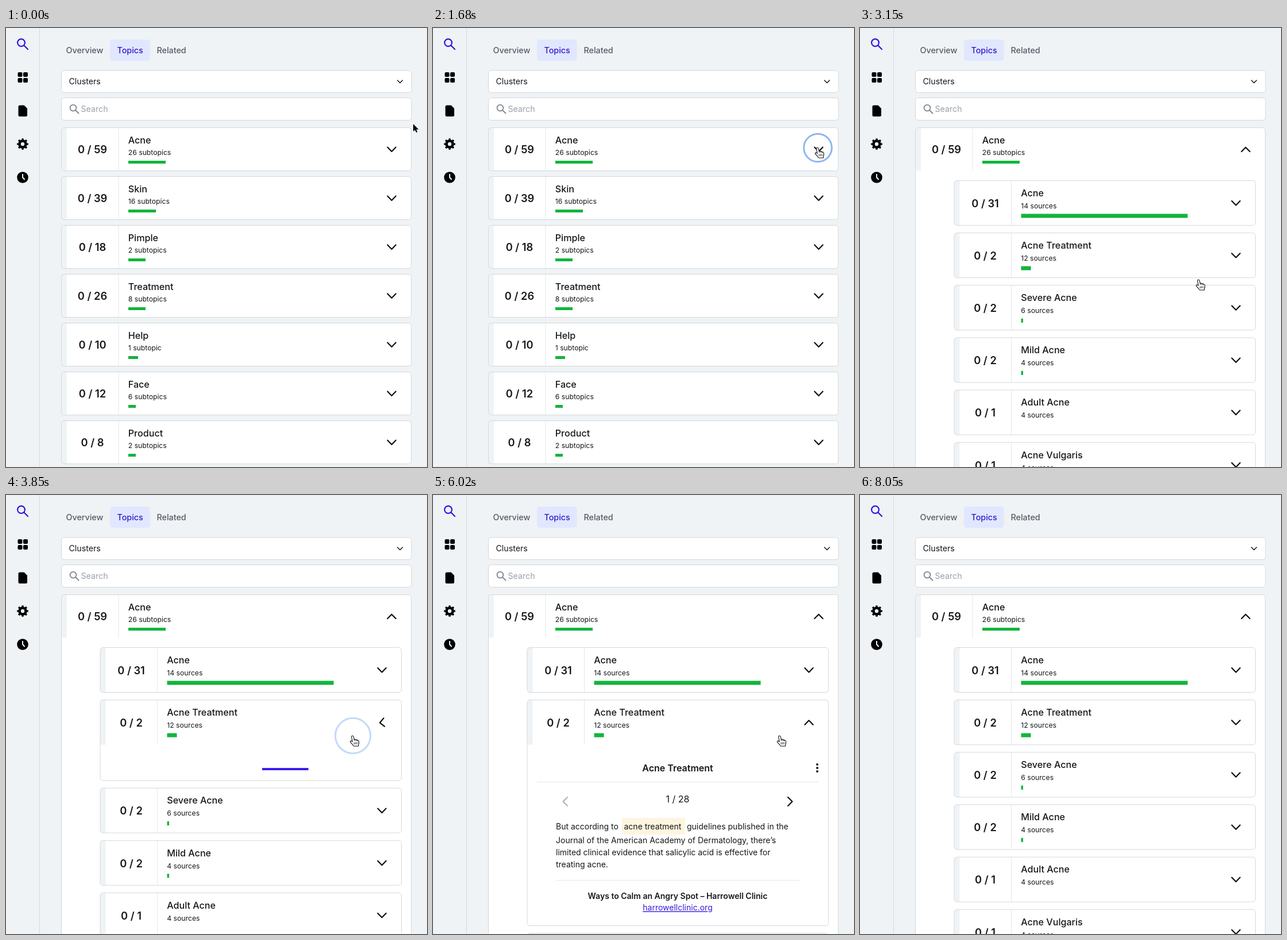
Recreate the animation shown at these times as an HTML page. Size 733 by 764 pixels, loop 8120 ms.

```html
<!DOCTYPE html>
<html lang="en">
<head>
<meta charset="utf-8">
<title>Topic clusters</title>
<style>
  html, body { margin: 0; width: 100%; height: 100%; overflow: hidden; background: #eff3f5; }
  svg { display: block; width: 733px; height: 764px; font-family: Inter, sans-serif; font-size: 14px; fill: #15171a; }
  .mid { text-anchor: middle; }
  .tab { font-size: 14.3px; font-weight: 500; fill: #565b67; }
  .title { font-size: 16.1px; font-weight: 500; }
  .note { font-size: 12.2px; }
  .count { font-size: 18.3px; font-weight: 600; }
  .box { fill: #fff; stroke: #d3d8dc; }
  .rule { fill: none; stroke: #e3e7ea; }
  .line { fill: none; stroke: #111; stroke-width: 2.2; stroke-linecap: round; stroke-linejoin: round; }
  .bar { fill: #12b53c; }
</style>
</head>
<body>
<svg viewBox="0 0 733 764">
  <path d="M58.5 0V764" stroke="#d5dade"/>
  <g fill="none" stroke="#2d12e0" stroke-width="2.2" stroke-linecap="round">
    <circle cx="26.5" cy="25.5" r="6.4"/><path d="M31.3 30.3L38 37"/>
  </g>
  <g fill="#000">
    <rect x="20.5" y="77" width="8" height="8" rx="2"/><rect x="30" y="77" width="8" height="8" rx="2"/>
    <rect x="20.5" y="87" width="8" height="8" rx="2"/><rect x="30" y="87" width="8" height="8" rx="2"/>
    <path d="M24 134.5H31.5L37 140V151.5Q37 154 34.5 154H24Q21.5 154 21.5 151.5V137Q21.5 134.5 24 134.5Z"/>
    <circle cx="29" cy="260" r="9.8"/>
  </g>
  <g fill="none" stroke="#000">
    <circle cx="29" cy="202" r="5.5" stroke-width="4.6"/>
    <circle cx="29" cy="202" r="8.4" stroke-width="2.8" pathLength="16" stroke-dasharray="1" stroke-dashoffset=".5"/>
    <path d="M29 254V260L32.6 264" stroke="#eff3f5" stroke-width="2"/>
  </g>

  <rect x="181" y="20" width="69.5" height="37" rx="5" fill="#e0e7ff"/>
  <text class="tab" x="104.5" y="43.6">Overview</text>
  <text class="tab" x="193.5" y="43.6" style="fill:#3419c9">Topics</text>
  <text class="tab" x="262.5" y="43.6">Related</text>

  <rect class="box" x="96.5" y="74" width="609.5" height="38.5" rx="5"/>
  <text x="109.5" y="98.3" font-size="14.2">Clusters</text>
  <path class="line" d="M681.5 91L686 95.5L690.5 91" style="stroke-width:1.4"/>
  <rect class="box" x="96.5" y="121.5" width="609.5" height="39" rx="5"/>
  <g fill="none" stroke="#7f858e" stroke-width="1.8" stroke-linecap="round">
    <circle cx="117" cy="139" r="5.4"/><path d="M121 143L126.5 148.5"/>
  </g>
  <text x="130.5" y="146" font-size="14.2" fill="#9aa0a9">Search</text>

  <g id="scene"></g>
</svg>
<script>
const LOOP = 8120, STEP = 70;
const OPEN_TOPIC = 1750, OPEN_SUB = 3780, LOADED = 5250, CLOSE_SUB = 6510;
const CLICKS = [[1550, 670, 208.5], [3590, 604, 419], [6350, 604, 419]];

const topics = [
  ['Acne', 59, '26 subtopics', 65], ['Skin', 39, '16 subtopics', 48], ['Pimple', 18, '2 subtopics', 30],
  ['Treatment', 26, '8 subtopics', 30], ['Help', 10, '1 subtopic', 17], ['Face', 12, '6 subtopics', 13],
  ['Product', 8, '2 subtopics', 13]];
const subtopics = [
  ['Acne', 31, '14 sources', 290], ['Acne Treatment', 2, '12 sources', 17], ['Severe Acne', 2, '6 sources', 3.5],
  ['Mild Acne', 2, '4 sources', 3.5], ['Adult Acne', 1, '4 sources', 0], ['Acne Vulgaris', 1, '4 sources', 0]];
// time, x, y of the pointer's hot spot
const pointerKeys = [
  [0, 709, 167], [350, 711, 168], [770, 711, 168], [1420, 670, 208], [1960, 670, 208], [2770, 590, 438],
  [3150, 590, 438], [3450, 604, 419], [7390, 604, 419], [7780, 540, 168], [8050, 415, -20]];

const clamp = v => Math.max(0, Math.min(1, v));
const text = (x, y, str, cls = '', extra = '') => `<text x="${x}" y="${y}" class="${cls}" ${extra}>${str}</text>`;
const rect = (x, y, w, h, attrs) => `<rect x="${x}" y="${y}" width="${w}" height="${h}" ${attrs}/>`;
const path = (d, attrs) => `<path d="${d}" ${attrs}/>`;

function card([name, total, note, bar], { x, y, w, head, height = head, turn = 0, sub = 0 }) {
  const cx = w - 34, cy = head / 2 + .3;
  return `<g transform="translate(${x} ${y})">` +
    rect(0, 0, w, height, 'rx="5" fill="#fff"') +
    path(`M9.5 0H5Q0 0 0 5V${head - 5}Q0 ${head} 5 ${head}H9.5Z`, 'fill="#eff3f5"') +
    path(`M99.5 0V${head}`, 'class="rule"') +
    rect(0, 0, w, height, 'rx="5" class="box" style="fill:none"') +
    text(54, 44.5 + sub * 1.8, '0 / ' + total, 'count mid') +
    text(116.3, 27.4, name, 'title') +
    text(116.3, 47.8 + sub * .6, note, 'note') +
    rect(116.5, 57.5 + sub * .4, bar, 5 + sub * 2, 'class="bar"') +
    path(`M${cx - 7.2} ${cy - 3.8}l7.2 7.4l7.2 -7.4`, `class="line" transform="rotate(${180 * turn} ${cx} ${cy})"`) +
    '</g>';
}

function article() {
  return text(426, 480.6, 'Acne Treatment', 'mid', 'font-size="16" font-weight="600"') +
    [469, 475, 481].map(y => `<circle cx="669" cy="${y}" r="2"/>`).join('') +
    path('M181 499.5H671M214 670.5H638', 'class="rule"') +
    path('M234 526L226.5 533.5L234 541', 'class="line" style="stroke:#a9adb2;stroke-width:1.8"') +
    path('M618 526L625.5 533.5L618 541', 'class="line"') +
    text(426, 535.3, '1 / 28', 'mid', 'font-size="16"') +
    rect(329, 562, 110, 29, 'fill="#fdf5df"') +
    text(214, 581.6, 'But according to') + text(332.5, 581.6, 'acne treatment') +
    text(442, 581.6, 'guidelines published in the') +
    text(214, 606.4, 'Journal of the American Academy of Dermatology, there’s') +
    text(214, 627.1, 'limited clinical evidence that salicylic acid is effective for') +
    text(214, 647.8, 'treating acne.') +
    text(426, 702.7, 'Ways to Calm an Angry Spot – Harrowell Clinic', 'mid', 'font-weight="600"') +
    text(426, 723.3, 'harrowellclinic.org', 'mid', 'fill="#3419d9" text-decoration="underline"');
}

function loader(t) {
  const x = 386 + 60 * Math.cos((t - 4850) / 1000 * 2 * Math.PI);
  return rect(x, 475, 80.5, 4, 'fill="#3a1df0"');
}

function openTopic(t) {
  const open = t >= OPEN_SUB && t < CLOSE_SUB, loaded = t >= LOADED;
  const extra = !open ? 0 : loaded ? 315 : 62.3;
  const turn = clamp((t - OPEN_SUB) / 150) - clamp((t - CLOSE_SUB) / 150);
  const rows = subtopics.map((s, i) => card(s, {
    x: 164, y: 265.5 + 91.15 * i + (i > 1 ? extra : 0), w: 524.5, head: 78, sub: 1,
    height: 78 + (i === 1 ? extra : 0), turn: i === 1 ? turn : 0 }));
  return rows.join('') + (!open ? '' : loaded ? article() : loader(t));
}

function ring(t) {
  return CLICKS.map(([start, x, y]) => {
    const p = (t - start) / 350;
    return p < 0 || p > 1 ? '' : `<circle cx="${x}" cy="${y}" r="${18 + 17 * p}" fill="none"
      stroke="#8fb5f2" stroke-width="3" opacity="${clamp(2 - 2 * p)}"/>`;
  }).join('');
}

function pointer(t) {
  const i = Math.max(1, pointerKeys.findIndex(k => k[0] >= t));
  const [t0, x0, y0] = pointerKeys[i - 1], [t1, x1, y1] = pointerKeys[i];
  const p = clamp((t - t0) / (t1 - t0)), e = p * p * (3 - 2 * p);
  const x = x0 + (x1 - x0) * e, y = y0 + (y1 - y0) * e;
  const hand = x < 706 && y > 173;
  return `<g transform="translate(${x} ${y})" stroke-linejoin="round">` + (hand
    ? path('M-2.4 2Q-2.6 0 -.8 0Q.8 0 1.2 1.8L2.2 6.6Q4 5.4 5 7.2Q6.8 6.2 7.8 8Q9.8 7.4 10.3 9.6Q11 12.5 9.6 15.5V18H1.5Q-.5 15.5 -4.4 11.2Q-5.2 9.2 -3.4 8.8Q-2.2 9 -.9 10.4Z',
        'fill="#fff" stroke="#111" stroke-width="1.1"') +
      path('M2.2 11.5V15M4.6 11.3V15M7 11V14.8M2.2 6.6L2.6 9M5 7.2L5.3 9M7.8 8L8 9.5', 'fill="none" stroke="#111" stroke-width=".9"')
    : path('M0 0V13L3 10.3L5.2 15L7.4 14L5.3 9.4H9.4Z', 'fill="#000" stroke="#fff" stroke-width="1" paint-order="stroke"')) + '</g>';
}

function draw(t) {
  const open = t >= OPEN_TOPIC;
  const cards = topics.slice(0, open ? 1 : 7).map((topic, i) => card(topic, {
    x: 96.5, y: 173.5 + 85 * i, w: 609, head: 75, height: open ? 700 : 75,
    turn: clamp((t - OPEN_TOPIC) / 150) }));
  return cards.join('') + (open ? openTopic(t) : '') + ring(t) + pointer(t);
}

const scene = document.getElementById('scene');
let shown = -1;
function tick() {
  const t = Math.floor(performance.now() % LOOP / STEP) * STEP;
  if (t !== shown) scene.innerHTML = draw(shown = t);
  requestAnimationFrame(tick);
}
tick();
</script>
</body>
</html>
```
